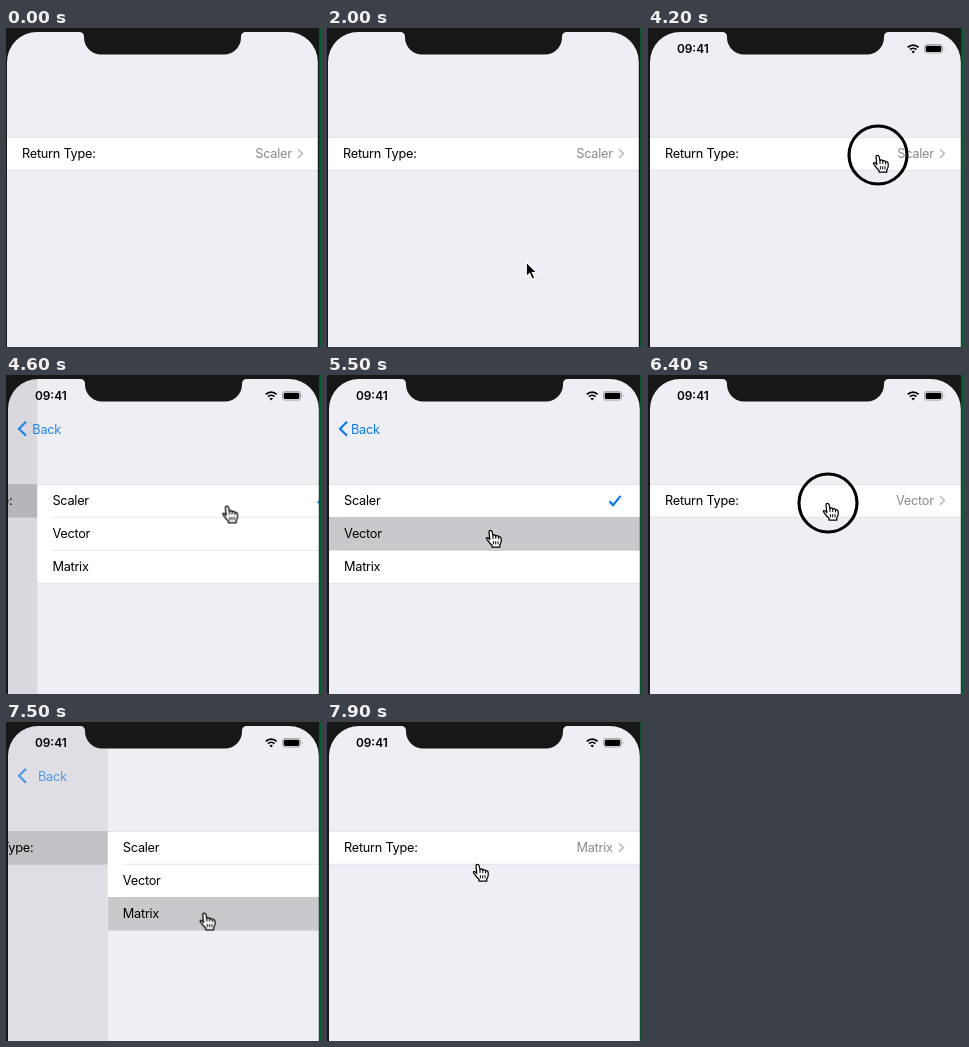
An HTML page for the animation above (8 s loop, 315 by 319 pixels).

```html
<!DOCTYPE html>
<html lang="en">
<head>
<meta charset="utf-8">
<title>Picker navigation</title>
<style>
  @property --p { syntax: '<number>'; inherits: true; initial-value: 0; }

  html, body { margin: 0; width: 100%; height: 100%; overflow: hidden; background: #171717; }
  svg { display: block; width: 315px; height: 319px; font: 12.75px Inter, Roboto, sans-serif; letter-spacing: -.27px; }

  /* --p: 0 = form showing, 1 = option list showing */
  svg { animation: nav 8s infinite cubic-bezier(.25, .7, .3, 1); }
  @keyframes nav {
    0%, 54.375% { --p: 0; }
    60.625%, 69.375% { --p: 1; }
    75.625%, 80.625% { --p: 0; }
    86.875%, 93.125% { --p: 1; }
    98.75%, 100% { --p: 0; }
  }
  .form { transform: translateX(calc(var(--p) * -93px)); }
  .page { transform: translateX(calc((1 - var(--p)) * 312px)); }
  .dim { opacity: calc(var(--p) * .1); }
  .back { opacity: var(--p); }
  .back text { transform: translateX(calc((1 - var(--p)) * 25px)); }

  .line { stroke: #dfdee4; stroke-width: .75; }
  .gray { fill: #c9c8cd; }
  .value { fill: #8a8a8e; text-anchor: end; }
  .blue { fill: none; stroke: #0c7bea; stroke-width: 2.2; }
  .time { font-size: 11.9px; font-weight: 600; letter-spacing: 0; text-anchor: middle; }

  .step { animation: 8s step-end infinite; }
  .nudge { animation-name: nudge; }
  @keyframes nudge { 0% { transform: none; } 27.5%, 100% { transform: translateX(1px); } }
  .late { animation-name: late; }
  @keyframes late { 0% { opacity: 0; } 27.5%, 100% { opacity: 1; } }
  .arrow { animation-name: arrow; }
  @keyframes arrow { 0%, 27.5%, 100% { opacity: 0; } 24.9% { opacity: 1; } }

  .one { animation-name: one; }
  .two { animation-name: two; }
  .three { animation-name: three; }
  @keyframes one { 0% { opacity: 1; } 69.375%, 100% { opacity: 0; } }
  @keyframes two { 0%, 93.125%, 100% { opacity: 0; } 69.375% { opacity: 1; } }
  @keyframes three { 0% { opacity: 0; } 93.125%, 100% { opacity: 1; } }

  .press2 { animation-name: press2; }
  .press3 { animation-name: press3; }
  @keyframes press2 { 0%, 76%, 100% { opacity: 0; } 68% { opacity: 1; } }
  @keyframes press3 { 0% { opacity: 0; } 92.7%, 100% { opacity: 1; } }
  .press1 { animation: press1 8s infinite linear; }
  @keyframes press1 {
    0%, 53.74% { opacity: 0; }
    53.75%, 69.375% { opacity: 1; }
    75.625%, 80.55% { opacity: 0; }
    80.6%, 93.125% { opacity: 1; }
    98.5%, 100% { opacity: 0; }
  }

  .cursor { animation: move 8s infinite ease-in-out; }
  @keyframes move {
    0%, 25% { transform: translate(200px, 234px); }
    30%, 40% { transform: translate(155px, 192px); }
    43.5%, 45% { transform: translate(281px, 63px); }
    47.5%, 55% { transform: translate(230px, 127px); }
    65%, 69% { transform: translate(164px, 155px); }
    73.75% { transform: translate(172px, 176px); }
    77.5%, 80.5% { transform: translate(180px, 128px); }
    85% { transform: translate(198px, 209px); }
    88.75%, 93.5% { transform: translate(199px, 191px); }
    98.5%, 100% { transform: translate(151px, 142px); }
  }
  .tap { animation-name: tap; }
  @keyframes tap {
    0%, 34.9%, 39.9%, 44.9%, 53.7%, 67.9%, 81.2%, 93.1%, 100% { opacity: 0; }
    33.7%, 38.7%, 43.7%, 52.4%, 66.2%, 79.9%, 91.2% { opacity: 1; }
  }
</style>
</head>
<body>
<svg viewBox="0 0 315 319">
  <defs>
    <path id="check" class="blue" d="M282.5 126.2l3.6 4 7.4-9.3"/>
  </defs>

  <rect width="315" height="319" fill="#efeef5"/>

  <g class="form">
    <rect width="420" height="319" fill="#efeef5"/>
    <rect y="109.5" width="420" height="32.5" fill="#fff"/>
    <path class="line" d="M0 109.5H420M0 142.2H420"/>
    <rect class="gray press1" y="109.2" width="420" height="33.2"/>
    <text class="step nudge" x="16" y="130.1">Return Type:</text>
    <g class="value">
      <text class="step one" x="285.7" y="130.1">Scaler</text>
      <text class="step two" x="285.7" y="130.1">Vector</text>
      <text class="step three" x="285.7" y="130.1">Matrix</text>
    </g>
    <path d="M292 121.3l4.4 4.3-4.4 4.3" fill="none" stroke="#bdbdc1" stroke-width="1.6"/>
  </g>
  <rect class="dim" width="315" height="319"/>

  <g class="page">
    <rect x="2" width="313" height="319" fill="#efeef5"/>
    <rect x="2" y="109.5" width="313" height="98.8" fill="#fff"/>
    <path class="line" d="M2 109.5H315M17 142.3H315M17 175.3H315M2 208.3H315"/>
    <rect class="gray step press2" x="2" y="142" width="313" height="33.5"/>
    <rect class="gray step press3" x="2" y="175" width="313" height="33.5"/>
    <text x="17" y="130.1">Scaler</text>
    <text x="17" y="163.2">Vector</text>
    <text x="17" y="196.3">Matrix</text>
    <use class="step one" href="#check"/>
    <g class="step two"><use href="#check" y="33"/></g>
    <g class="step three"><use href="#check" y="66"/></g>
  </g>

  <g class="back">
    <path class="blue" d="M20 46.8l-7 7 7 7"/>
    <text x="24" y="58.5" fill="#0c7bea">Back</text>
  </g>

  <g class="step late">
    <text class="time" x="44.8" y="25.1">09:41</text>
    <g fill="none" stroke="#000" stroke-width="1.8">
      <path d="M259.8 19.3a7.6 7.6 0 0 1 10.8 0M262 21.7a4.6 4.6 0 0 1 6.4 0"/>
    </g>
    <path d="M263.5 23.5a2.6 2.6 0 0 1 3.4 0l-1.7 1.9z"/>
    <rect x="276.5" y="16.5" width="18" height="8.6" rx="2.3" fill="none" stroke="#96959b" stroke-width=".8"/>
    <rect x="277.7" y="17.7" width="15.6" height="6.2" rx="1.3"/>
    <path d="M295.8 19.3q1.6 1.5 0 3z" fill="#96959b"/>
  </g>

  <!-- bezel with notch -->
  <path class="step nudge" fill="#171717" fill-rule="evenodd"
    d="M-4 -1H318V330H-4Z M1 325V34A30 30 0 0 1 31 4H73.5A4.5 4.5 0 0 1 78 8.5V9.6A17 17 0 0 0 95 26.6H218A17 17 0 0 0 235 9.6V8.5A4.5 4.5 0 0 1 239.5 4H281.8A30 30 0 0 1 311.8 34V325Z"/>
  <rect x="313.2" width="1.8" height="319" fill="#046032"/>

  <g class="cursor">
    <circle class="step tap" r="29" fill="none" stroke="#000" stroke-width="3.1"/>
    <g class="step arrow">
      <path transform="translate(-.7)" d="M0 0V14.8L3.4 11.6 5.9 17.2 8.5 16 6.1 10.6H10.6Z" stroke="#fff" stroke-width="1.2"/>
    </g>
    <g class="step late" stroke="#000" stroke-width="1.25" stroke-linejoin="round">
      <path fill="#fff" d="M-1.2 9.5L-2 2Q-2 .3 -.6 .3Q.8 .3 1.2 1.8L2 6Q2.2 4.8 3.4 4.9Q4.6 5 4.8 6.3Q5.2 5.4 6.3 5.6Q7.4 5.8 7.6 7.2Q8 6.5 9 6.8Q10.2 7.2 10.2 8.7V11.2Q10 13.2 8.8 14.8V17H1V15.2Q-1.5 13 -3 10.8Q-5.2 8.6 -4.4 7.8Q-3.2 7 -1.2 9.5Z"/>
      <path fill="none" stroke-width="1" d="M2 6V9M4.8 6.3V9M7.6 7.2V9.4M2.4 11.2V14.4M4.7 11.2V14.4M7 11.2V14.4"/>
    </g>
  </g>
</svg>
</body>
</html>
```
